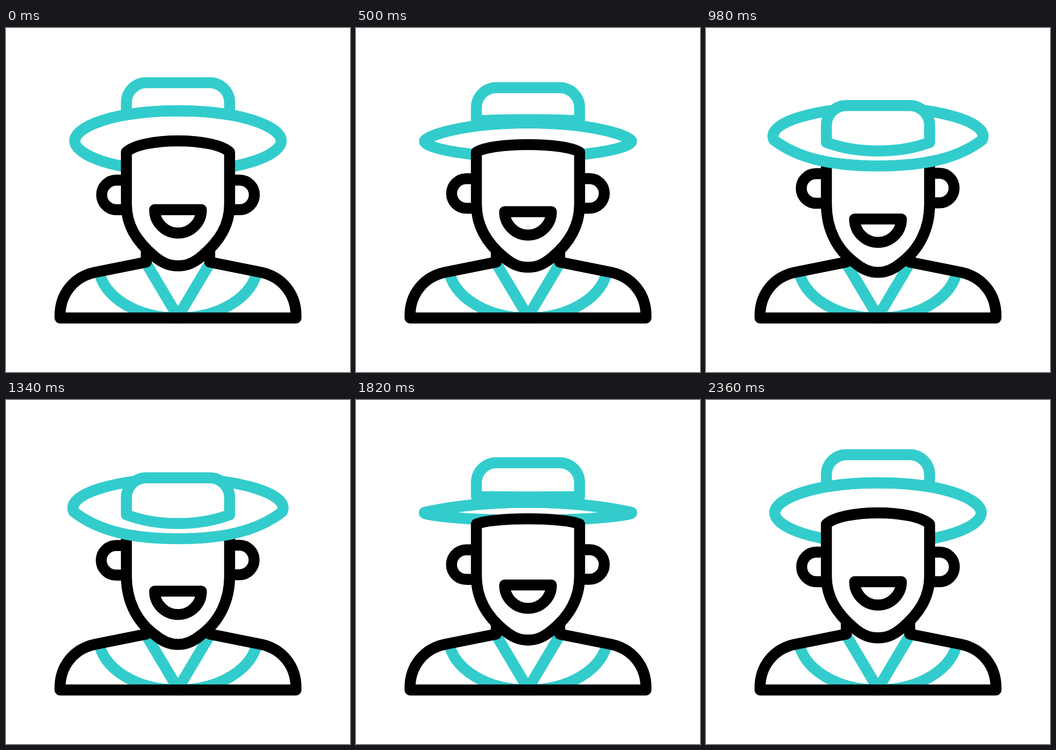
An HTML page with a canvas that plays this animation: 640x640 px, repeating every 2400 ms.

```html
<!DOCTYPE html>
<html lang="en">
<head>
<meta charset="utf-8">
<title>Nodding man in a hat</title>
<style>
html, body { margin: 0; width: 100%; height: 100%; overflow: hidden; background: #fff; }
canvas { display: block; width: 640px; height: 640px; }
</style>
</head>
<body>
<canvas id="stage" width="640" height="640"></canvas>
<script>
const ctx = document.getElementById("stage").getContext("2d");
const TEAL = "#33cccc", BLACK = "#000", WHITE = "#fff";
const LOOP = 2400, STEP = 20, DOWN_END = 1200, UP_END = 2360;
const STROKE = 20.4, EASE = 0.8;

const mix = (a, b, p) => a + (b - a) * p;

// Symmetric cubic ease with handles at (EASE, 0) and (1 - EASE, 1).
function ease(x) {
  if (x <= 0) return 0;
  if (x >= 1) return 1;
  let lo = 0, hi = 1;
  for (let i = 0; i < 30; i++) {
    const s = (lo + hi) / 2, r = 1 - s;
    const at = 3 * r * r * s * EASE + 3 * r * s * s * (1 - EASE) + s * s * s;
    if (at < x) lo = s; else hi = s;
  }
  return lo * lo * (3 - 2 * lo);
}

function tilt(time) {
  return time < DOWN_END
    ? ease(time / DOWN_END)
    : ease((UP_END - time) / (UP_END - DOWN_END));
}

function draw(path, color, fill) {
  const shape = new Path2D(path);
  if (fill) {
    ctx.fillStyle = fill;
    ctx.fill(shape);
  }
  ctx.strokeStyle = color;
  ctx.lineWidth = STROKE;
  ctx.stroke(shape);
}

// Symmetric arch from (x0, y0) over (320, y3) to the mirrored start, and the way back.
function arch(x0, y0, x1, y1, x2, y3) {
  const m0 = 640 - x0, m1 = 640 - x1, m2 = 640 - x2;
  return {
    there: `C${x1} ${y1} ${x2} ${y3} 320 ${y3} C${m2} ${y3} ${m1} ${y1} ${m0} ${y0}`,
    back: `C${m1} ${y1} ${m2} ${y3} 320 ${y3} C${x2} ${y3} ${x1} ${y1} ${x0} ${y0}`
  };
}

function drawBody() {
  draw("M172.7 450 A148 99 0 0 0 467.3 450", TEAL);
  draw("M261 438 L317.2 532.5 M379 438 L322.8 532.5", TEAL);
  draw("M261 413 V435.5 L166 454.5 C125 463 100.5 496 100.5 535 V539.5 " +
       "H539.5 V535 C539.5 496 515 463 474 454.5 L379 435.5 V413", BLACK);
}

function drawHead(p) {
  const leftTop = 283 - 12.3 * p, rightTop = 283 - 13 * p;
  const leftX = 205.5 - 0.8 * p, rightX = 434.5 - 0.4 * p;
  draw(`M224 ${leftTop} H${leftX} a27.5 27.5 0 0 0 0 55 H224`, BLACK);
  draw(`M416 ${rightTop} H${rightX} a27.5 27.5 0 0 1 0 55 H416`, BLACK);

  const edge = 231, crest = mix(210, 242, p);
  const top = arch(224, edge, 238, mix(edge, crest, 0.65), 278, crest);
  const jawX = mix(275, 278, p), jawY = mix(424, 438, p);
  const c1y = mix(366, 372, p), c2x = mix(242, 242, p), c2y = mix(396, 412, p);
  const chin = arch(jawX, jawY, 291.5, mix(438, 449.5, p), 304.5, mix(442.5, 454.9, p));
  draw(`M224 ${edge} V328 C224 ${c1y} ${c2x} ${c2y} ${jawX} ${jawY} ${chin.there} ` +
       `C${640 - c2x} ${c2y} 416 ${c1y} 416 328 V${edge} ${top.back} Z`, BLACK, WHITE);

  const lip = 338 + 17.8 * p;
  draw(`M276.5 ${lip} H363.5 A43.5 43.5 0 0 1 276.5 ${lip} Z`, BLACK, WHITE);
}

function brim(p) {
  const x = mix(128, 126, p), y = mix(210, 208, p);
  const front = arch(x, y, mix(128, 175, p), mix(184, 246, p), mix(200, 240, p), mix(154, 259, p));
  const rear = arch(x, y, mix(128, 110, p), mix(236, 173, p), mix(200, 214, p), mix(266, 144.5, p));
  return {
    front: `M${x} ${y} ${front.there}`,
    whole: `M${x} ${y} ${front.there} ${rear.back} Z`
  };
}

function drawCrown(p) {
  const top = mix(101.7, 145.2, p), edge = mix(161.5, 214, p), mid = mix(154, 230.5, p);
  const base = arch(224, edge, 250, mix(edge, mid, 0.6), 285, mid);
  draw(`M224 ${edge} V${top + 37} A37 37 0 0 1 261 ${top} H379 ` +
       `A37 37 0 0 1 416 ${top + 37} V${edge} ${base.back} Z`, TEAL, WHITE);
}

function render(time) {
  const p = tilt(time), hat = brim(p), seenFromAbove = p > 0.5;
  ctx.fillStyle = WHITE;
  ctx.fillRect(0, 0, 640, 640);
  ctx.lineJoin = "round";
  ctx.lineCap = "butt";

  if (!seenFromAbove) draw(hat.whole, TEAL, WHITE);
  drawBody();
  drawHead(p);
  if (seenFromAbove) draw(hat.whole, TEAL, WHITE);
  drawCrown(p);
  if (!seenFromAbove) draw(hat.front, TEAL);
}

const start = performance.now();
function tick() {
  const time = (performance.now() - start) % LOOP;
  render(Math.floor(time / STEP) * STEP);
  requestAnimationFrame(tick);
}
tick();
</script>
</body>
</html>
```
